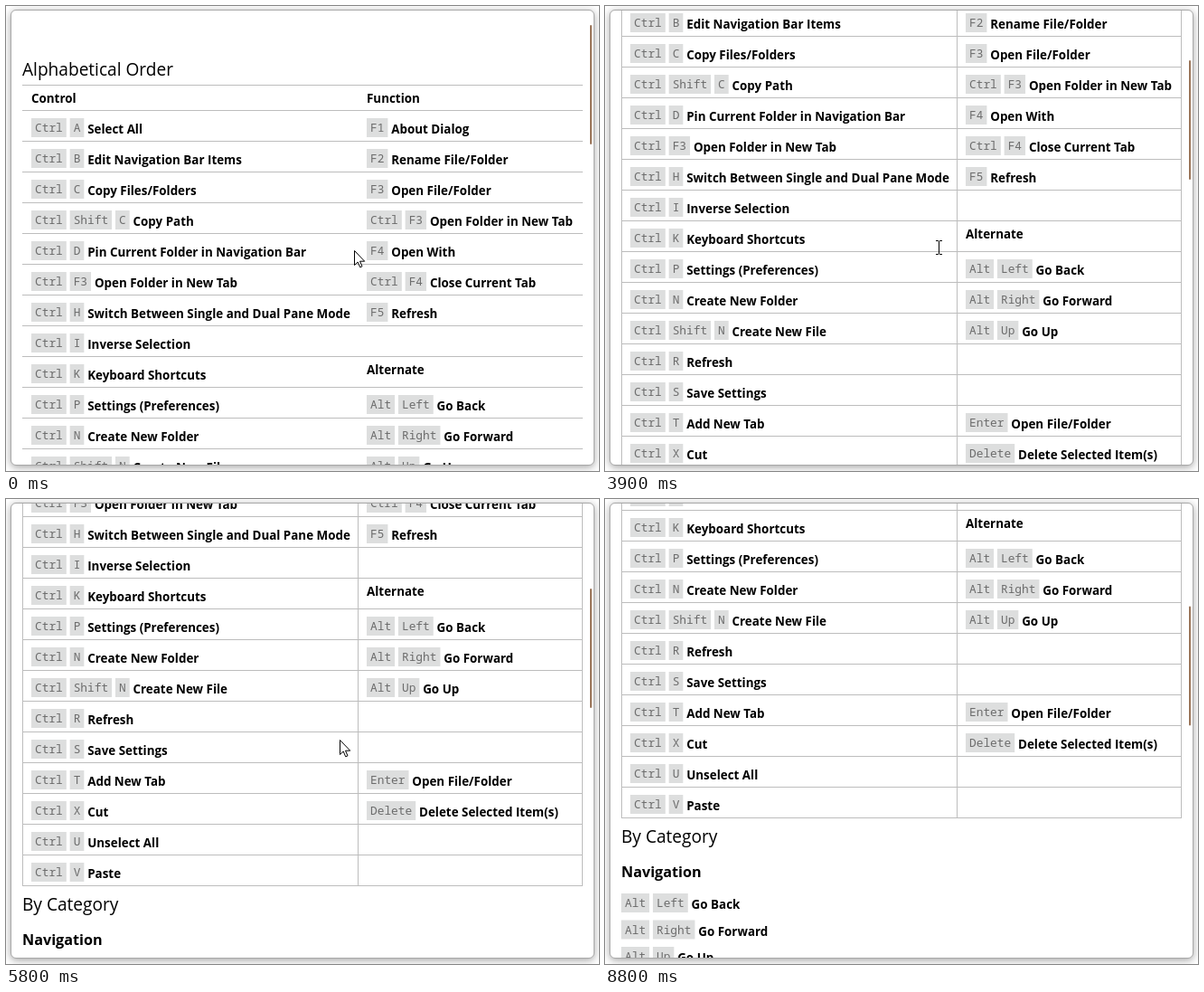
Write an HTML page that moves like this. It is 656 px wide and 514 px high and loops after 9.1 s.

```html
<!DOCTYPE html>
<html lang="en">
<head>
<meta charset="utf-8">
<title>Keyboard shortcuts</title>
<style>
  html, body { margin: 0; width: 100%; height: 100%; overflow: hidden; background: #fff; }
  #panel {
    position: absolute; left: 5px; top: 4px; width: 644px; height: 502px; overflow: hidden;
    border: 1px solid #a8a8a8; border-radius: 6px; background: #fff;
    box-shadow: 0 2px 8px rgba(0, 0, 0, .36);
  }
  svg { display: block; }
  text { font: 700 13.4px "Open Sans", "Noto Sans", sans-serif; white-space: pre; }
  .title { font-weight: 400; font-size: 19.1px; }
  .section { font-size: 16.2px; }
  .key { font: 400 12.83px "Noto Sans Mono", "DejaVu Sans Mono", monospace; fill: #6c6c6c; }
  .cap { fill: #dddede; }
  .line { fill: #bdbdbd; shape-rendering: crispEdges; }
</style>
</head>
<body>
<div id="panel">
  <svg width="644" height="502" viewBox="6 5 644 502">
    <g id="page"><g id="columns"></g></g>
    <rect id="thumb" x="646" width="2" height="132" rx="1" fill="#9a7459"/>
    <path id="arrow" d="M.5 .5V16.5L4.2 13 6.7 18.8 9 17.8 6.5 12.2H11.7Z" fill="#fff" stroke="#000"/>
    <path id="beam" d="M-3-7.5h3M1-7.5h3M.5-7V7M-3 7.5h3M1 7.5h3" stroke="#000" fill="none" shape-rendering="crispEdges"/>
  </svg>
</div>
<script>
const $ = id => document.getElementById(id);
const page = $('page'), columns = $('columns'), thumb = $('thumb');
const LOOP = 9100, STEP = 100;
const TABLE_TOP = 87, FIRST_ROW = 115, ROW = 34;

function add(parent, tag, attrs, content = '') {
  const el = document.createElementNS('http://www.w3.org/2000/svg', tag);
  for (const name in attrs) el.setAttribute(name, attrs[name]);
  el.textContent = content;
  parent.append(el);
}
const label = (x, y, content, cls = '') => add(page, 'text', { x, y, class: cls }, content);
const line = (parent, x, y, width, height) => add(parent, 'rect', { x, y, width, height, class: 'line' });

// "Ctrl+A|Select All" becomes key caps followed by a label
function shortcut(x, y, entry) {
  const [keys, name] = entry.split('|');
  for (const key of keys.split('+')) {
    const width = key.length * 7.7 + 8;
    add(page, 'rect', { x, y: y - 17, width, height: 21, class: 'cap' });
    label(x + 4, y - 2, key, 'key');
    x += width + 3.84;
  }
  label(x, y, name);
}

function column(x, heading, entries) {
  label(x, TABLE_TOP + 20, heading);
  entries.forEach((entry, i) => {
    const top = FIRST_ROW + i * ROW;
    if (entry.includes('|')) shortcut(x, top + 26, entry);
    else label(x, top + 20, entry);
  });
}

const control = [
  'Ctrl+A|Select All', 'Ctrl+B|Edit Navigation Bar Items', 'Ctrl+C|Copy Files/Folders',
  'Ctrl+Shift+C|Copy Path', 'Ctrl+D|Pin Current Folder in Navigation Bar',
  'Ctrl+F3|Open Folder in New Tab', 'Ctrl+H|Switch Between Single and Dual Pane Mode',
  'Ctrl+I|Inverse Selection', 'Ctrl+K|Keyboard Shortcuts', 'Ctrl+P|Settings (Preferences)',
  'Ctrl+N|Create New Folder', 'Ctrl+Shift+N|Create New File', 'Ctrl+R|Refresh',
  'Ctrl+S|Save Settings', 'Ctrl+T|Add New Tab', 'Ctrl+X|Cut', 'Ctrl+U|Unselect All', 'Ctrl+V|Paste'
];
const navigation = ['Alt+Left|Go Back', 'Alt+Right|Go Forward', 'Alt+Up|Go Up'];
const functions = [
  'F1|About Dialog', 'F2|Rename File/Folder', 'F3|Open File/Folder', 'Ctrl+F3|Open Folder in New Tab',
  'F4|Open With', 'Ctrl+F4|Close Current Tab', 'F5|Refresh', '', 'Alternate', ...navigation,
  '', '', 'Enter|Open File/Folder', 'Delete|Delete Selected Item(s)'
];
const tableEnd = FIRST_ROW + control.length * ROW;

label(18, 77, 'Alphabetical Order', 'title');
line(page, 18, TABLE_TOP, 620, 1);
for (let y = FIRST_ROW; y <= tableEnd; y += ROW) line(page, 18, y, 620, 1);
for (const x of [18, 389, 637]) line(columns, x, TABLE_TOP, 1, tableEnd - TABLE_TOP);
column(28, 'Control', control);
column(399, 'Function', functions);
label(18, 755, 'By Category', 'title');
label(18, 793, 'Navigation', 'section');
navigation.forEach((entry, i) => shortcut(18, 828 + i * 29.5, entry));

// Start of each wheel notch
const notches = [2590, 3650, 4450, 5416, 6751];
const NOTCH = 75, NOTCH_TIME = 250;
const easeOut = u => 1 - (1 - Math.min(1, Math.max(0, u))) ** 3;
const scrollAt = t => Math.round(notches.reduce((sum, start) => sum + NOTCH * easeOut((t - start) / NOTCH_TIME), 0));

// Pointer: time, x, y, shape
const pointer = [
  [0, 385, 270, 'arrow'], [100, 389, 260, 'arrow'], [400, 386, 259, 'arrow'], [500, 379, 259, 'arrow'],
  [600, 372, 258, 'beam'], [700, 370, 258, 'beam'], [2200, 370, 259, 'beam'], [2400, 370, 260, 'beam'],
  [2600, 370, 261, 'beam'], [2700, 370, 263, 'beam'], [2800, 370, 264, 'beam'],
  [3700, 370, 265, 'beam'], [3800, 369, 267, 'beam'], [4700, 368, 266, 'arrow'],
  [5800, 369, 266, 'arrow'], [5900, 370, 265, 'arrow'], [7300, 371, 266, 'beam'],
  [8200, 362, 272, 'arrow'], [8300, 335, 291, 'arrow'], [8400, 285, 328, 'arrow'],
  [8500, 215, 380, 'arrow'], [8600, 130, 440, 'arrow'], [8700, 54, 495, 'arrow'], [8800, 54, 540, 'arrow']
];

function draw() {
  const now = performance.now() % LOOP;
  const t = now - now % STEP;
  const scroll = scrollAt(t);
  page.setAttribute('transform', `translate(0 ${-scroll})`);
  columns.style.display = scroll ? '' : 'none';
  thumb.setAttribute('y', 21 + scroll * .26);
  const [, x, y, shape] = pointer.findLast(p => p[0] <= t);
  for (const id of ['arrow', 'beam']) {
    $(id).style.display = id === shape ? '' : 'none';
    $(id).setAttribute('transform', `translate(${x} ${y})`);
  }
  requestAnimationFrame(draw);
}
draw();
</script>
</body>
</html>
```
